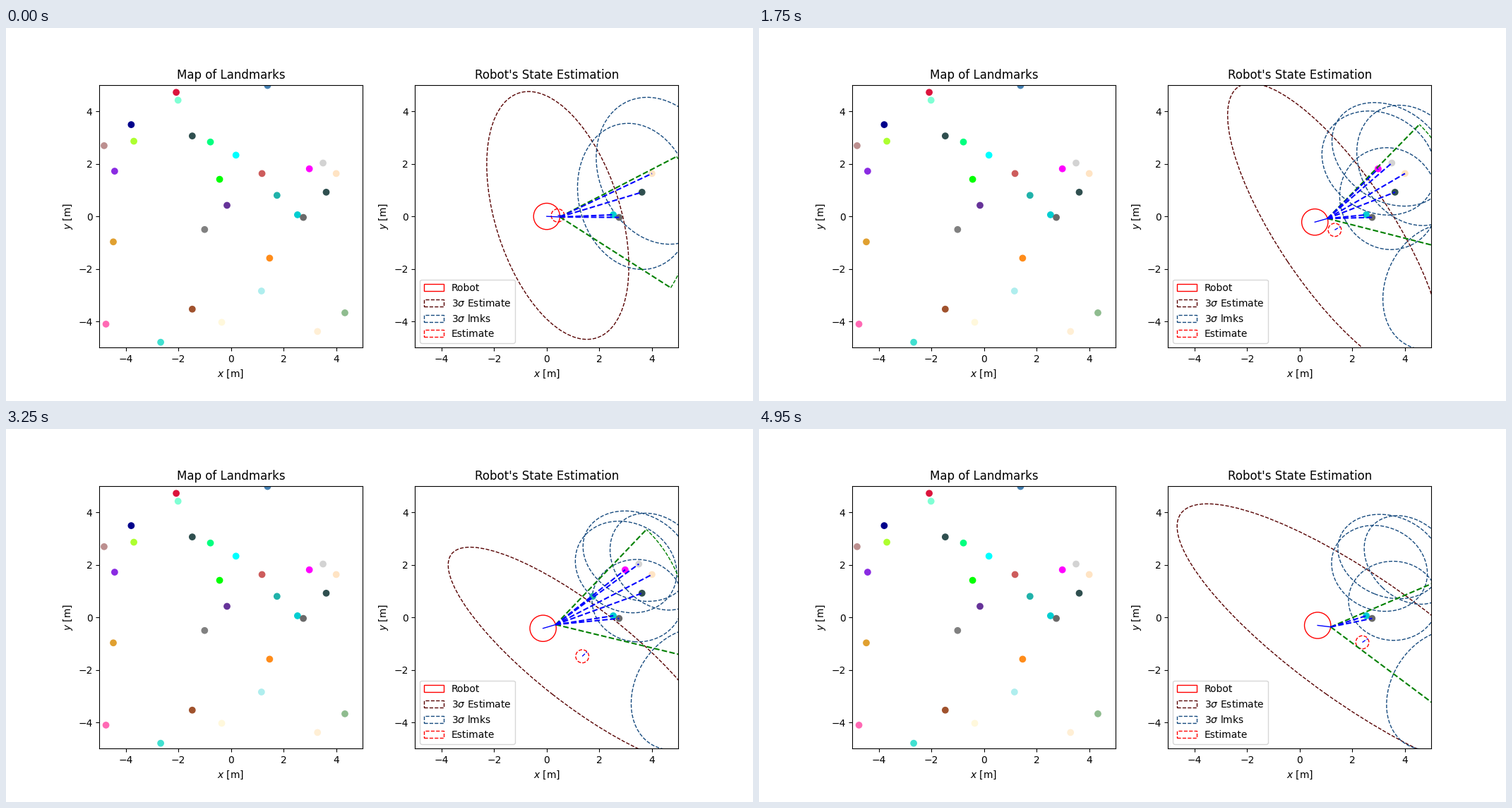
These frames come from a looping animation (1058x529 px, 5000 ms). A matplotlib script:

```python
import numpy as np
import matplotlib.pyplot as plt
from matplotlib.animation import FuncAnimation
from matplotlib.patches import Circle, Ellipse

plt.rcParams["font.family"] = "DejaVu Sans"

FRAMES, INTERVAL = 100, 50
ROBOT_RADIUS, ESTIMATE_RADIUS = 0.5, 0.25
VIEW_RANGE, HALF_VIEW = 5.0, np.radians(30)
ESTIMATE_COLOR, LANDMARK_COLOR = "#560000", "#164a7e"

LANDMARKS = [
    (-2.08, 4.72, "crimson"), (-2.01, 4.42, "aquamarine"),
    (1.39, 4.98, "steelblue"), (-3.79, 3.49, "darkblue"),
    (-3.69, 2.86, "greenyellow"), (-4.82, 2.69, "rosybrown"),
    (-4.42, 1.72, "blueviolet"), (-1.47, 3.06, "darkslategray"),
    (-0.78, 2.83, "springgreen"), (0.19, 2.33, "cyan"),
    (-0.43, 1.41, "lime"), (1.18, 1.63, "indianred"),
    (1.75, 0.80, "lightseagreen"), (-0.15, 0.42, "rebeccapurple"),
    (2.98, 1.81, "magenta"), (3.50, 2.03, "lightgray"),
    (4.00, 1.63, "bisque"), (3.62, 0.92, "darkslategray"),
    (2.53, 0.06, "darkturquoise"), (2.75, -0.04, "dimgray"),
    (-1.00, -0.50, "gray"), (-4.47, -0.97, "#e0a030"),
    (1.47, -1.59, "#ff8c1a"), (1.16, -2.84, "paleturquoise"),
    (-1.47, -3.53, "sienna"), (-0.35, -4.03, "cornsilk"),
    (4.33, -3.67, "darkseagreen"), (3.29, -4.38, "papayawhip"),
    (-4.75, -4.10, "hotpink"), (-2.67, -4.79, "turquoise"),
]
POINTS = np.array([(x, y) for x, y, _ in LANDMARKS])
COLORS = np.array([c for *_, c in LANDMARKS])

# Waypoints shared by all paths
STEPS = [0, 11, 27, 43, 53, 78, 99]
# x, y, heading in degrees
ROBOT_PATH = [
    (0, 0, -2.6), (0.42, -0.1, -15.9), (0.73, -0.17, 7), (0.42, -0.265, 24.4),
    (-0.075, -0.41, 11.4), (-0.21, -0.425, 21.8), (0.68, -0.305, -6.8),
]
# x, y, half width, half height, correlation
ESTIMATE_PATH = [
    (0.42, 0.035, 2.70, 4.715, -0.411), (1.25, 0.15, 2.455, 4.63, 0.03),
    (1.18, -0.16, 3.63, 6.99, -0.738), (1.48, -0.87, 4.51, 4.17, -0.826),
    (1.157, -1.27, 4.86, 4.56, -0.85), (1.56, -1.71, 5.35, 3.71, -0.822),
    (2.38, -0.95, 7.04, 5.27, -0.837),
]
HEADING_DRIFT = 0.42  # degrees per step

# How far each landmark's uncertainty has shrunk at the waypoints
SLOW = [0, 0.01, 0.23, 0.68, 0.79, 0.93, 1]
FAST = [0, 0.28, 0.46, 0.86, 0.92, 0.985, 1]
LATE = [0, 0, 0, 0, 0.46, 0.93, 1]
# first step, shrinking, first and last (x, y, half width, half height, correlation)
LANDMARK_TRACKS = [
    (0, SLOW, (4.24, 1.735, 2.36, 2.795, -0.18), (4.15, 2.185, 1.70, 1.685, -0.26)),
    (0, FAST, (3.36, 0.76, 2.19, 2.78, -0.12), (3.555, 0.63, 1.70, 1.505, -0.01)),
    (10, SLOW, (5.14, -2.62, 2.0, 2.47, 0.15), (5.30, -2.75, 2.0, 2.28, 0.25)),
    (34, LATE, (3.0, 2.03, 2.16, 1.98, -0.17), (3.03, 1.865, 1.82, 1.635, -0.12)),
    (34, LATE, (3.41, 2.36, 2.185, 1.97, -0.26), (3.41, 2.315, 1.96, 1.605, -0.19)),
]


def sample(path, step):
    return [np.interp(step, STEPS, column) for column in zip(*path)]


def track_state(shrinking, first, last, step):
    first, last = np.array(first), np.array(last)
    state = first + (last - first) * np.interp(step, STEPS, shrinking)
    state[0] = first[0] + (last[0] - first[0]) * (step / (FRAMES - 1)) ** 2
    return state


def polar(radius, angle):
    return radius * np.array([np.cos(angle), np.sin(angle)])


def set_segment(line, start, end):
    line.set_data([start[0], end[0]], [start[1], end[1]])


def set_covariance(ellipse, x, y, half_w, half_h, corr):
    sxx, syy, sxy = half_w**2, half_h**2, corr * half_w * half_h
    mean, spread = (sxx + syy) / 2, np.hypot((sxx - syy) / 2, sxy)
    ellipse.set_center((x, y))
    ellipse.width = 2 * np.sqrt(mean + spread)
    ellipse.height = 2 * np.sqrt(mean - spread)
    ellipse.angle = np.degrees(np.arctan2(2 * sxy, sxx - syy) / 2)


fig, (map_ax, state_ax) = plt.subplots(1, 2, figsize=(10.58, 5.29), dpi=100)
for ax, title in ((map_ax, "Map of Landmarks"),
                  (state_ax, "Robot's State Estimation")):
    ax.set(title=title, xlabel="$x$ [m]", ylabel="$y$ [m]",
           xlim=(-5, 5), ylim=(-5, 5), aspect="equal")
map_ax.scatter(*POINTS.T, c=COLORS)


def add_ellipse(color, label=None):
    return state_ax.add_patch(Ellipse((0, 0), 1, 1, fill=False, ls="--",
                                      ec=color, label=label))


def add_line(color, style="--", width=1.5):
    return state_ax.plot([], [], color=color, ls=style, lw=width)[0]


robot = state_ax.add_patch(
    Circle((0, 0), ROBOT_RADIUS, fill=False, ec="red", label="Robot"))
estimate_ellipse = add_ellipse(ESTIMATE_COLOR, r"3$\sigma$ Estimate")
landmark_ellipses = [add_ellipse(LANDMARK_COLOR, None if i else r"3$\sigma$ lmks")
                     for i in range(len(LANDMARK_TRACKS))]
estimate = state_ax.add_patch(
    Circle((0, 0), ESTIMATE_RADIUS, fill=False, ec="red", ls="--", label="Estimate"))

seen_dots = state_ax.scatter([], [])
robot_heading = add_line("blue", "-", 1)
estimate_heading = add_line("blue", "--", 1)
view_edges = [add_line("green") for _ in range(2)]
view_arc = add_line("green", "--", 1)
sight_lines = [add_line("blue") for _ in LANDMARKS]
state_ax.legend(loc="best")


def update(step):
    x, y, degrees = sample(ROBOT_PATH, step)
    heading = np.radians(degrees)
    center = np.array([x, y])
    tip = center + polar(ROBOT_RADIUS, heading)
    robot.set_center(center)
    set_segment(robot_heading, center, tip)

    for edge, side in zip(view_edges, (HALF_VIEW, -HALF_VIEW)):
        set_segment(edge, tip, tip + polar(VIEW_RANGE, heading + side))
    sweep = heading + np.linspace(-HALF_VIEW, HALF_VIEW, 60)
    view_arc.set_data(*(tip[:, None] + polar(VIEW_RANGE, sweep)))

    dx, dy = (POINTS - tip).T
    seen = ((np.hypot(dx, dy) < VIEW_RANGE)
            & (np.abs(np.arctan2(dy, dx) - heading) < HALF_VIEW))
    seen_dots.set_offsets(POINTS[seen])
    seen_dots.set_color(list(COLORS[seen]))
    for line, point, visible in zip(sight_lines, POINTS, seen):
        if visible:
            set_segment(line, tip, point)
        else:
            line.set_data([], [])

    covariance = sample(ESTIMATE_PATH, step)
    set_covariance(estimate_ellipse, *covariance)
    middle = np.array(covariance[:2])
    estimate.set_center(middle)
    angle = np.radians(degrees + HEADING_DRIFT * step)
    set_segment(estimate_heading, middle, middle + polar(ESTIMATE_RADIUS, angle))

    for ellipse, (start, *track) in zip(landmark_ellipses, LANDMARK_TRACKS):
        ellipse.set_visible(step >= start)
        set_covariance(ellipse, *track_state(*track, step))
    return []


anim = FuncAnimation(fig, update, frames=FRAMES, interval=INTERVAL,
                     repeat=True, repeat_delay=0, blit=False)
plt.show()
```
